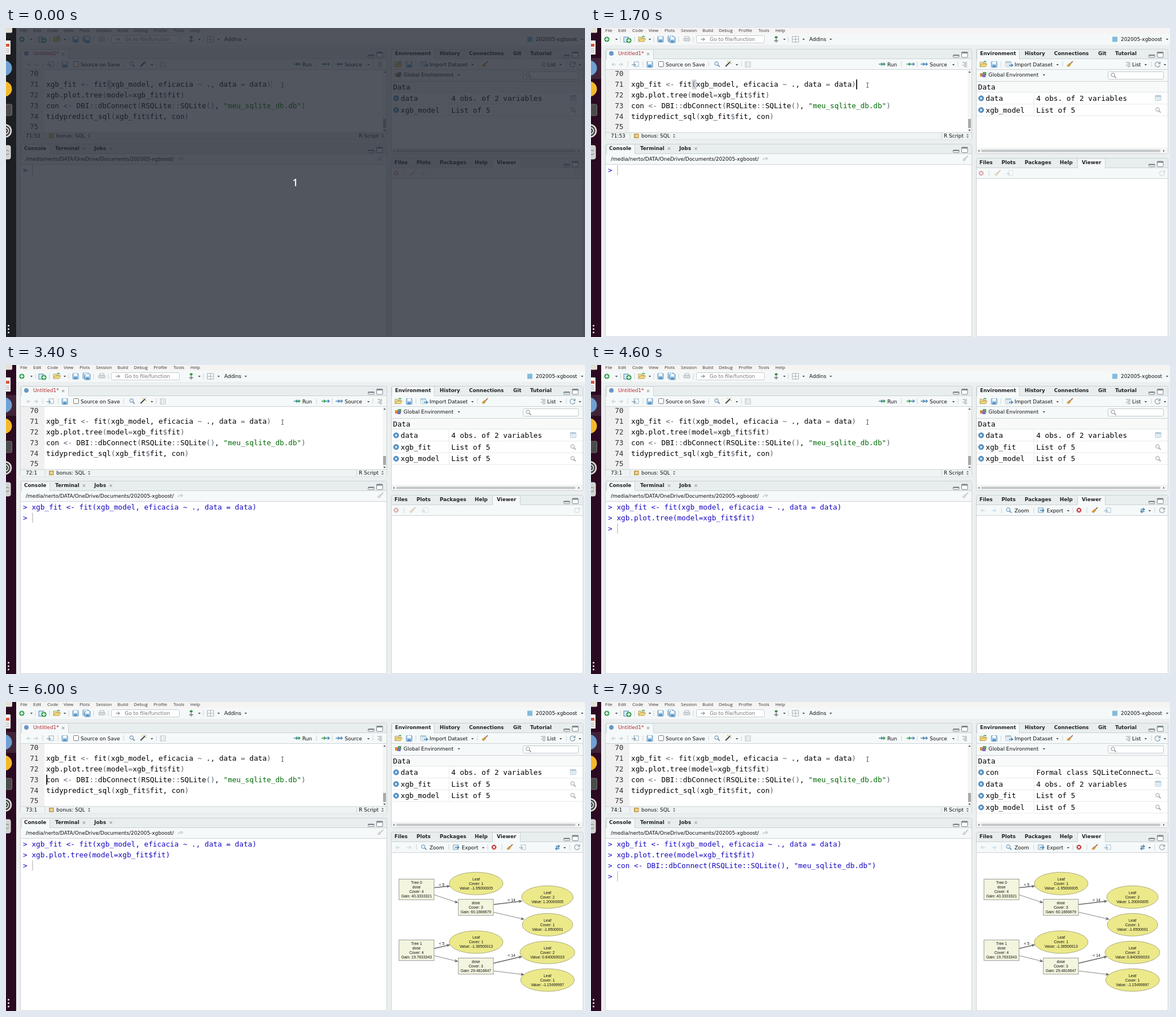
These frames come from a looping animation (1024x547 px, 8000 ms). An HTML page:

```html
<!DOCTYPE html>
<html lang="en">
<head>
<meta charset="utf-8">
<title>Boosted trees in the editor</title>
<style>
html, body { margin: 0; width: 100%; height: 100%; overflow: hidden; background: #eceff0; }
svg { display: block; width: 1024px; height: 547px; }
text { white-space: pre; font-family: "DejaVu Sans", sans-serif; font-size: 8.95px; fill: #111; }
.tab { font-weight: bold; font-size: 8.85px; fill: #222; }
.menu { font-family: "Open Sans", sans-serif; font-size: 8px; fill: #333; }
.code { font-family: "DejaVu Sans Mono", monospace; font-size: 12.71px; fill: #000; }
.num { fill: #333; text-anchor: end; }
.con { fill: #1508c0; }
.node { font-family: "Liberation Sans", Arial, sans-serif; font-size: 6.8px; text-anchor: middle; fill: #111; }
.op { fill: #566273; }
.str { fill: #036a07; }
.count { font-family: "Open Sans", sans-serif; font-size: 17.5px; font-weight: 600; fill: #fff; text-anchor: middle; }
</style>
</head>
<body>
<svg id="stage" viewBox="0 0 1024 547"></svg>
<script>
const CODE = [
  "", "xgb_fit <- fit(xgb_model, eficacia ~ ., data = data)",
  "xgb.plot.tree(model=xgb_fit$fit)",
  'con <- DBI::dbConnect(RSQLite::SQLite(), "meu_sqlite_db.db")',
  "tidypredict_sql(xgb_fit$fit, con)", ""
];
const GREY = "#8d9499", BLUE = "#4a86b8", GREEN = "#2f9e4f", LINE = "#ccd2d5", BAR = "#f5f9f9";

const esc = s => s.replace(/&/g, "&amp;").replace(/</g, "&lt;");
const rect = (x, y, w, h, fill, stroke = "none", r = 0) =>
  `<rect x="${x}" y="${y}" width="${w}" height="${h}" rx="${r}" fill="${fill}" stroke="${stroke}"/>`;
const circle = (x, y, r, fill, stroke = "none", w = 1) =>
  `<circle cx="${x}" cy="${y}" r="${r}" fill="${fill}" stroke="${stroke}" stroke-width="${w}"/>`;
const path = (d, stroke = GREY, w = 1, fill = "none") =>
  `<path d="${d}" stroke="${stroke}" stroke-width="${w}" fill="${fill}"/>`;
const shape = (d, fill) => path(d, "none", 0, fill);
const raw = (x, y, s, cls = "", fill = "") =>
  `<text x="${x}" y="${y}" class="${cls}"${fill && ` style="fill:${fill}"`}>${s}</text>`;
const text = (x, y, s, cls, fill) => raw(x, y, esc(s), cls, fill);
const group = (id, body, extra = "") => `<g id="${id}" ${extra}>${body}</g>`;

// Small icons, each centred on x, y
const down = (x, y) => shape(`M${x - 2.2} ${y - 1}h4.4l-2.2 2.6z`, "#444");
const updown = (x, y) => shape(`M${x - 2} ${y - 1}h4l-2-2.4zM${x - 2} ${y + 1}h4l-2 2.4z`, "#666");
const cross = (x, y, c = "#aaa") => path(`M${x - 2} ${y - 2}l4 4m0-4l-4 4`, c, 1.4);
const arrow = (x, y, c, d = 1) => path(`M${x - 4 * d} ${y}h${6 * d}m${-2 * d} -2.5l${3 * d} 2.5l${-3 * d} 2.5`, c, 1.5);
const disk = (x, y, c = "#5f97c4") => rect(x - 5, y - 5, 10, 10, "#b5d3ea", c, 1) +
  rect(x - 3, y - 5, 6, 4, "#fff") + rect(x - 3, y + 1, 6, 4, c);
const lens = (x, y, c = "#999") => circle(x - 1, y - 1, 3.2, "#fff", c) + path(`M${x + 1.5} ${y + 1.5}l3 3`, c, 1.6);
const folder = (x, y) => path(`M${x - 6} ${y + 4}v-8h4l1 1.5h5v2`, "#b9a254", 1, "#f4e3a0") +
  path(`M${x - 6} ${y + 4}l2.5-5h10l-2.5 5z`, "#b9a254", 1, "#f1d77a") + path(`M${x} ${y - 4}q3-3 5 0`, GREEN, 1.5);
const broom = (x, y, c = "#cf9a45", handle = "#9b5a34") => path(`M${x + 5} ${y - 5}l-5 5`, handle, 1.6) +
  shape(`M${x - 1} ${y - 2}l3 3l-4 4l-4-2z`, c);
const wand = (x, y) => path(`M${x - 5} ${y + 4}l8-8`, "#444", 2) + path(`M${x + 3} ${y - 1}h3m-2-4l1-1m-6 0v2`, "#d1a93a", 1.2);
const grid = (x, y, c = "#a9c6d6") => rect(x - 5, y - 4.5, 10, 9, "#fff", c, 1) +
  path(`M${x - 5} ${y - 1.5}h10m-10 3h10m-6.5-6v9m3-9v9`, c, .6) + rect(x - 5, y - 4.5, 10, 2, c);
const page = (x, y, c) => rect(x - 3, y - 4, 8, 8, "#fff", c) + arrow(x - 3, y + 1, c);
const reload = (x, y, c) => path(`M${x + 4} ${y - 2}a4.5 4.5 0 1 0 .4 3M${x + 4.6} ${y - 5}v3.5h-3.5`, c, 1.3);
const stop = (x, y, c) => circle(x, y, 4.3, c) + cross(x, y, "#fff");
const plus = (x, y) => circle(x, y, 4.6, GREEN) + path(`M${x - 3} ${y}h6m-3-3v6`, "#fff", 1.6);
const sep = (x, y) => path(`M${x} ${y - 5}v10`, LINE);
const lines = (x, y) => path(`M${x - 4} ${y - 3}h8m-5 2.5h5m-8 2.5h8m-5 2.5h5`, "#888", .9);
const sizers = (x, y) => rect(x, y + 5, 10.5, 4.5, "#fff", "#7d868c", 1) + rect(x, y + 5, 10.5, 2, "#7d868c") +
  rect(x + 15, y, 10.5, 9.5, "#fff", "#7d868c", 1) + rect(x + 15, y, 10.5, 2.5, "#7d868c");

const pane = (x, y, w, h) => rect(x, y, w, h, "#fff", LINE, 2) + rect(x + .5, y + .5, w - 1, 16.5, "#e8edee") +
  rect(x + .5, y + 17, w - 1, 18.5, BAR) + path(`M${x} ${y + 17}h${w}m0 19h${-w}`, LINE);
const active = (x, y, w) => path(`M${x} ${y + 18}v-15q0-2 2-2h${w - 4}q2 0 2 2v15`, LINE, 1, BAR);
const tabs = (y, list) => list.map(([x, s]) => text(x, y, s, "tab")).join("");

function tint(line) {
  return line.replace(/"[^"]*"|<-|[~=$():]+|[^"<~=$():]+/g, s => {
    const cls = s[0] === '"' ? "str" : /^(<-|[~=$():]+)$/.test(s) ? "op" : "";
    return cls ? `<tspan class="${cls}">${esc(s)}</tspan>` : esc(s);
  });
}

function dock() {
  let s = group("dockBack", rect(0, 0, 18, 547, "#2a0a20")) + group("focus", rect(0, 53, 18, 37, "#fff"), 'opacity=".1"');
  s += rect(-12, -10, 23, 18.5, "#e4e2d6", "none", 2);
  s += rect(-12, 22, 20, 25, "#f7f5f2", "none", 1) + rect(-6, 28, 12, 5, "#d2553f") + path("M0 37h6m-6 3h6m-6 3h6", "#aaa");
  s += circle(-3, 71, 13.5, "#6f9fd3") + circle(-3, 108, 13.5, "#f4b92b");
  s += rect(-12, 135, 22.5, 20, "#4b4a4a", "#77716f", 2);
  s += circle(-2, 182, 11, "#4a4948", "#e2e0dd", 2.5) + circle(-1, 182, 5.5, "none", "#eee", 1.5) + circle(-1, 182, 2, "#eee");
  s += rect(-12, 208, 20, 24, "#d2d2d0", "#e8e8e6", 3) + path("M-2 220a4 4 0 0 1 7-2m0 4a4 4 0 0 1-7 0", "#888", 1.3);
  return s + [527, 533, 539].map(y => circle(4.5, y, 1.5, "#fff")).join("");
}

function topBar() {
  const menu = [[25, "File"], [48, "Edit"], [73, "Code"], [102, "View"], [130, "Plots"], [159, "Session"],
    [197, "Build"], [226, "Debug"], [261, "Profile"], [296, "Tools"], [326, "Help"]];
  let s = rect(18, 0, 1006, 547, "#eceff0") + rect(18, 0, 1006, 10, "#f5f4f3") + rect(18, 10, 1006, 20, "#f5f8f8");
  s += menu.map(([x, m]) => text(x, 6.5, m, "menu")).join("");
  s += plus(28, 20) + down(45, 20) + sep(52, 20) + rect(58, 16, 8, 9, "#d6eaf5", BLUE) + plus(67, 22) + sep(77, 20);
  s += folder(90, 20) + down(104, 20) + sep(111, 20) + disk(123, 20) + disk(141, 19) + disk(144, 21) + sep(155, 20);
  s += rect(164, 18, 11, 5, "#d9dcdd", "#b4b9bb", 1) + rect(166, 15, 7, 3, "#fff", "#b4b9bb") + sep(181, 20);
  s += rect(186.5, 13.5, 120, 13, "#fff", "#c5cbce", 2) + arrow(198, 20, "#9ba2a6") + text(210, 23.3, "Go to file/function", "", "#777");
  s += rect(325, 15, 5, 3, GREEN) + rect(324, 21, 7, 3, "#a9aaa6") + path("M327.5 14v12", "#666") + down(342, 20) + sep(349, 20);
  s += rect(356, 15, 11, 10, "#fff", "#a3a9ad") + path("M361.5 15v10m-5.5-5h11", "#a3a9ad") + down(376, 20);
  s += text(386, 23.3, "Addins") + down(424, 20);
  return s + rect(922, 15.5, 9, 9, "#82bbdc") + text(937, 23.3, "202005-xgboost") + down(1019, 20);
}

function editor() {
  let s = pane(25.5, 37.5, 648, 160) + active(27.5, 37, 83);
  s += circle(36, 45, 4, "#6996c6") + text(48, 48.2, "Untitled1*", "", "#b0282e") + cross(101, 46) + sizers(640.5, 42.5);
  s += arrow(40, 64.5, "#cdd2d4", -1) + arrow(53, 64.5, "#cdd2d4") + sep(65, 64) + page(79, 64, "#8fabbc") + sep(92, 64) + disk(104, 64.5);
  s += rect(119.5, 59.5, 9, 9, "#fff", "#777", 1) + text(132, 67.5, "Source on Save") + sep(208, 64);
  s += lens(223, 64, "#557ba0") + wand(243, 64) + down(258, 65) + sep(266, 64) + rect(273, 60, 9, 9, "#fff", "#b7bec2") + path("M275 60v9m2-6h4m-4 3h4", "#b7bec2");
  s += arrow(513, 64, BLUE) + arrow(517, 64, GREEN) + text(524, 67.5, "Run") + sep(549, 64);
  s += arrow(562, 64, GREEN) + arrow(569, 64, BLUE) + sep(577, 64) + arrow(587, 64, BLUE) + arrow(592, 64, BLUE);
  s += text(599, 67.5, "Source") + down(641, 65) + sep(649, 64) + lines(661, 64);
  s += rect(26, 74, 42, 111, "#f0f0f0") + group("paren", rect(179, 92, 7, 16, "#d5d7d9", "#c4c7c9", 1));
  s += CODE.map((c, i) => {
    const y = 85.4 + 18.8 * i;
    return text(57.5, y, String(70 + i), "code num") + raw(71, y, tint(c), "code");
  }).join("");
  s += rect(666, 74, 7, 111, "#f5f5f5") + rect(667, 161, 5, 16, "#a9a9a9") + down(669.5, 181) + shape("M667.5 79h4l-2-2.5z", "#444");
  s += rect(26, 185, 647, 12.5, "#eff3f3") + path("M26 185h647", LINE) + group("pos", text(35, 194.2, ""));
  s += sep(69, 191) + rect(76, 187, 8.5, 8, "#c99b3c", "none", 1) + path("M79.5 188.5v5m2-5v5m-4-3.5h6m-6 2h6", "#fff", .7) + text(89, 194.2, "bonus: SQL") + updown(147, 191);
  s += sep(620, 191) + text(624, 194.2, "R Script") + updown(666, 191);
  s += path("M489 97.5v7m-1.8-7.5q1.8 0 1.8 1q0-1 1.8-1m-3.6 8.5q1.8 0 1.8-1q0 1 1.8 1", "#444");
  return s + group("ghost", rect(469.2, 92, 1, 16, "#aab4bf")) + group("caret", rect(0, 0, 1.7, 17.5, "#000"));
}

function consolePane() {
  let s = pane(25.5, 205.5, 648, 341) + active(27.5, 205, 50);
  s += tabs(216.3, [[32, "Console"], [87, "Terminal"], [156, "Jobs"]]) + cross(138, 213.5) + cross(185.5, 213.5) + sizers(640.5, 211);
  s += text(35, 235, "/media/nerto/DATA/OneDrive/Documents/202005-xgboost/") + path("M304 234q1-4 6-3m-1-2.5l3.5 2.5l-3.5 2.5", "#b8c0c4", 1.2);
  s += broom(662, 231, "#d4d4d2", "#bcbcba");
  for (let i = 1; i <= 3; i++) s += group("out" + i, text(45.4, 237.4 + 19 * i, CODE[i], "code con"));
  for (let i = 0; i < 4; i++) s += group("prompt" + i, text(30, 256.4 + 19 * i, ">", "code con"));
  return s + group("conCaret", rect(46.5, 242.5, 1, 18, "#aaa"));
}

function envRow(id, name, value, table) {
  return group(id, circle(690, 124.5, 4.5, "#5b97c9", "#3f7db1") + shape("M688.7 122l3.5 2.5l-3.5 2.5z", "#fff") +
    text(698, 129, name, "code") + text(787.5, 129, value, "code") + (table ? grid(1003, 124) : lens(1003, 124.5)) +
    path("M682 134.7h338M783.5 114.5v20", "#e6eaeb"));
}

function environment() {
  let s = pane(681.5, 37.5, 339, 185) + active(682.5, 37, 75);
  s += tabs(48.2, [[688, "Environment"], [767, "History"], [819, "Connections"], [897, "Git"], [927, "Tutorial"]]) + sizers(986.5, 42.5);
  s += folder(694, 64.5) + disk(713, 64.5) + sep(725, 64) + grid(738, 64) + arrow(743, 66, BLUE) + text(749, 67.5, "Import Dataset") + down(825, 65) + sep(834, 64) + broom(847, 64);
  s += lines(950, 64) + text(957, 67.5, "List") + down(981, 65) + sep(991, 64) + reload(1002, 64.5, "#8ba3b2") + down(1015, 65);
  s += rect(682, 74, 338, 20, BAR) + path("M682 94.5h338", LINE);
  s += rect(688, 80, 6, 6, "#d88a3c") + rect(693, 78, 6, 6, "#5d9e62") + rect(692, 82, 6, 5, "#7b6fc0") + text(703, 86, "Global Environment") + down(801, 83);
  s += rect(914.5, 77.5, 98, 13, "#fff", "#bfc6c9", 2) + lens(924, 84, "#888");
  s += rect(682, 95, 338, 18.5, "#f8f9f9") + text(684.5, 108.7, "Data", "code") + path("M682 113.8h338", "#e2e6e8");
  s += envRow("con", "con", "Formal class SQLiteConnect…") + envRow("data", "data", "4 obs. of 2 variables", true) +
    envRow("fit", "xgb_fit", "List of 5") + envRow("model", "xgb_model", "List of 5");
  s += rect(682, 212, 338, 10, "#f3f4f4") + rect(690, 215.5, 317, 4, "#c3c6c8", "none", 2);
  return s + shape("M687 215.5v4l-2.5-2zM1012 215.5v4l2.5-2z", "#666");
}

const label = (x, y, rows) => rows.map((r, i) => text(x, y + 8.05 * (i - (rows.length - 1) / 2) + 2.4, r, "node")).join("");
const box = (x, y, h, rows) => rect(x - 31, y - h / 2, 62, h, "#f3f5df", "#999") + label(x, y, rows);
const leaf = (x, y, rx, cover, value) =>
  `<ellipse cx="${x}" cy="${y}" rx="${rx}" ry="20" fill="#ece98b" stroke="#9a9868" stroke-width=".8"/>` +
  label(x, y, ["Leaf", "Cover: " + cover, "Value: " + value]);
function edge(x1, y1, x2, y2, w) {
  const a = Math.atan2(y2 - y1, x2 - x1) * 180 / Math.PI;
  return path(`M${x1} ${y1}L${x2 - 3} ${y2 - 3 * (y2 - y1) / (x2 - x1)}`, "#666", w) +
    `<path d="M0 0l-7-2.8l2 2.8l-2 2.8z" fill="#666" transform="translate(${x2} ${y2}) rotate(${a})"/>`;
}

function tree(n, root, y1, mid, y2, y3, gains, values, rx) {
  return edge(757, root - 3, 786, y1 + 4.5, 1.5) + edge(757, root + 9.5, 800, mid - 8, .8) +
    edge(862, mid - 5, 913.5, y2 + 7, 1.5) + edge(862, mid + 8.5, 917, y3 - 9.5, .8) +
    text(770.5, y1 + 4.8, "< 5", "node") + text(894, y2 + 7.6, "< 14", "node") +
    box(726, root, 36.5, ["Tree " + n, "dose", "Cover: 4", "Gain: " + gains[0]]) +
    box(831, mid, 28.5, ["dose", "Cover: 3", "Gain: " + gains[1]]) +
    leaf(831.5, y1, 47.5, 1, values[0]) + leaf(957.5, y2, rx[0], 2, values[1]) + leaf(957.7, y3, rx[1], 1, values[2]);
}

function viewer() {
  let s = pane(681.5, 230.5, 339, 316) + active(860.5, 230, 49);
  s += tabs(241.3, [[687, "Files"], [726, "Plots"], [767, "Packages"], [829, "Help"], [868, "Viewer"]]) + sizers(986.5, 236);
  s += group("idle", stop(690, 257, "#d9a3a6") + sep(704, 257) + broom(719, 257, "#e2d8c4", "#cdb9ad") + page(741, 257, "#d6dee1") + reload(1010, 257, "#d6dcde"));
  s += group("busy", arrow(693, 257.5, "#cfdde6", -1) + arrow(713, 257.5, "#cfdde6") + sep(726, 257) + lens(739, 257, "#4d83ad") +
    text(749, 260.5, "Zoom") + sep(783, 257) + rect(791, 253, 9, 8, "#e7f0f5", "#86a8bd") + arrow(798, 257.5, BLUE) + text(806, 260.5, "Export") + down(844, 258) + sep(852, 257) +
    stop(863, 257, "#c4333b") + sep(877, 257) + broom(891, 257) + page(914, 257, "#a9c0cd") +
    arrow(976, 255.5, BLUE) + arrow(975, 259.5, BLUE, -1) + down(988, 258) + sep(997, 257) + reload(1010, 257, "#9aa9b2"));
  return s + group("plot",
    tree(0, 331.8, 321.3, 363.5, 345.3, 394.3, ["40.3333321", "60.1666679"], ["-1.95000005", "1.20000005", "-1.6500001"], [45.5, 44.7]) +
    tree(1, 439.5, 425, 467.5, 443.3, 492.2, ["19.7633343", "29.4816647"], ["-1.36500013", "0.840000033", "-1.15499997"], [48.5, 47.5]));
}

const stage = document.getElementById("stage");
stage.innerHTML = topBar() + editor() + consolePane() + environment() + viewer() +
  group("veil", rect(18, 0, 1006, 547, "rgba(34,39,49,.78)") + text(511.5, 279.8, "1", "count")) + dock();

const el = {};
stage.querySelectorAll("[id]").forEach(n => el[n.id] = n);
const show = (id, on) => el[id].setAttribute("display", on ? "inline" : "none");
const move = (id, x, y) => el[id].setAttribute("transform", `translate(${x} ${y})`);

const RUNS = [2000, 4100, 6500];
const BLINKS = [800, 1300, 1700, 2400, 2800, 3400, 3800, 4600, 5000, 5600, 6000, 6900, 7300, 7900];
const passed = (list, t) => list.filter(x => t >= x).length;

function draw(t) {
  const run = passed(RUNS, t);
  show("veil", t < 500);
  el.dockBack.firstChild.setAttribute("fill", t < 500 ? "#1d1e22" : "#2a0a20");
  show("focus", t >= 800);
  show("ghost", t < 800);
  show("paren", run === 0);
  show("caret", passed(BLINKS, t) % 2 === 1);
  move("caret", run ? 71.2 : 468.9, 91 + 18.9 * run);
  el.pos.firstChild.textContent = run ? `${71 + run}:1` : "71:53";
  for (let i = 1; i <= 3; i++) show("out" + i, run >= i);
  for (let i = 0; i < 4; i++) show("prompt" + i, run >= i);
  move("conCaret", 0, 19 * run);

  const rows = { con: t >= 6500, data: true, fit: t >= 2100, model: true };
  let n = 0;
  for (const id in rows) {
    show(id, rows[id]);
    if (rows[id]) move(id, 0, 20.7 * n++);
  }
  show("idle", t < 4100);
  show("busy", t >= 4100);
  show("plot", t >= 4700);
}

function tick() {
  draw(performance.now() % 8000);
  requestAnimationFrame(tick);
}
tick();
</script>
</body>
</html>
```
